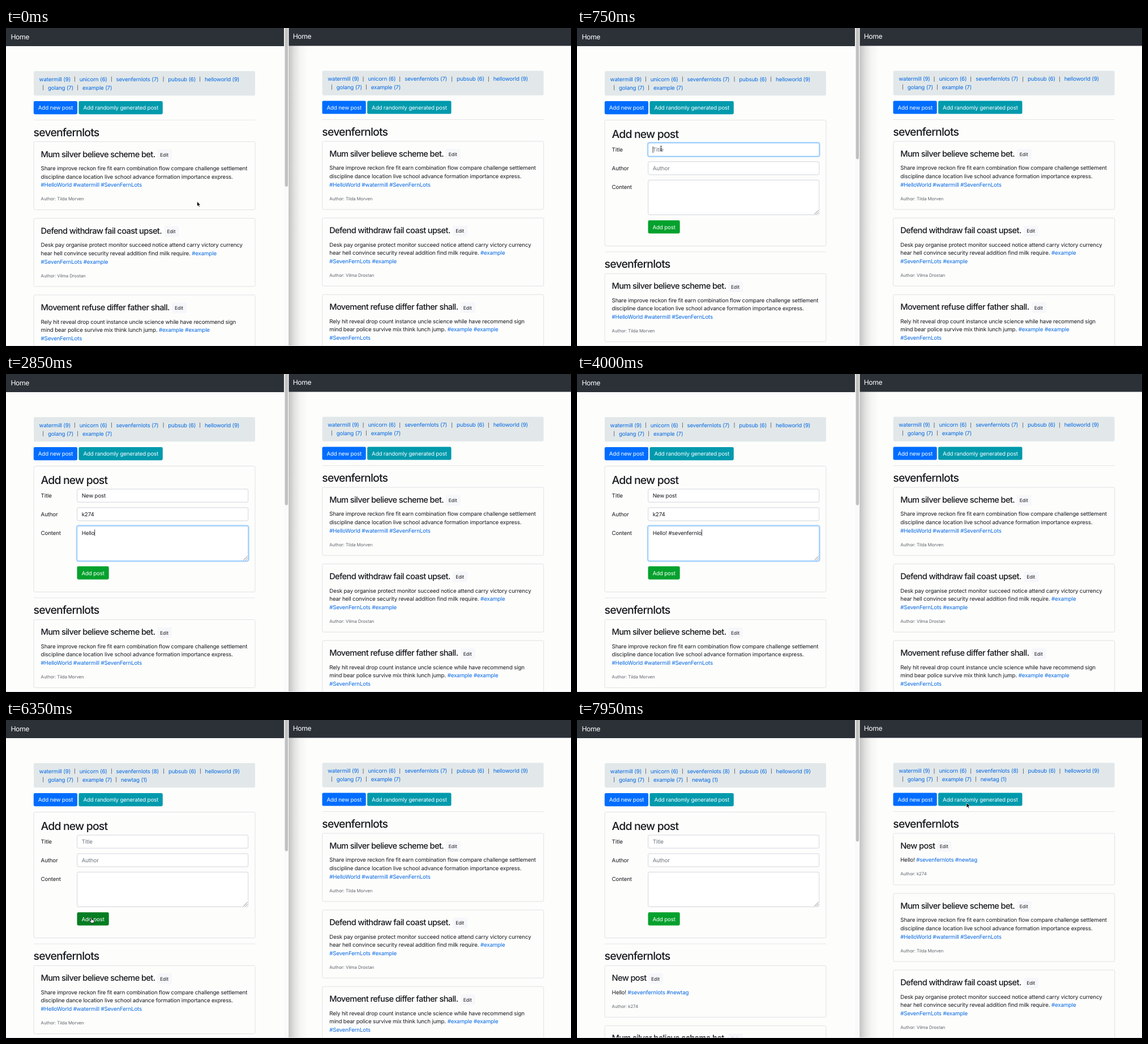
An HTML page for the animation above (8000 ms loop, 998 px wide and 561 px high).

```html
<!DOCTYPE html>
<html lang="en">
<head>
<meta charset="utf-8">
<title>Live feed</title>
<style>
  html, body { margin: 0; width: 100%; height: 100%; overflow: hidden; background: #fdfdfc; }
  svg { display: block; width: 998px; height: 561px; }
  text {
    font: 9.73px Inter, "Open Sans", sans-serif; letter-spacing: -.0155em; fill: #16191d;
    white-space: pre; font-optical-sizing: none; text-rendering: geometricPrecision;
  }
  .h2 { font-size: 19.46px; font-weight: 500; letter-spacing: -.043em; }
  .h4 { font-size: 14.6px; font-weight: 500; letter-spacing: -.042em; }
  .brand { font-size: 12.16px; letter-spacing: -.03em; fill: #fff; }
  .small { font-size: 7.78px; letter-spacing: -.008em; fill: #5e656c; }
  .edit { font-size: 8.5px; letter-spacing: 0; }
  .bar { font-size: 7.6px; }
  .light { fill: #fff; }
  .muted { fill: #6c757d; }
  .link { fill: #0568e4; }
  .card { fill: none; stroke: #dadbdd; stroke-width: .8; }
  .field { fill: #fff; stroke: #c6ccd3; stroke-width: .8; }
  .focus { stroke: #80bdff; }
  .ring { fill: none; stroke: #aed8fb; stroke-width: 2; }
</style>
</head>
<body>
<svg viewBox="0 0 998 561">
  <defs>
    <linearGradient id="shade">
      <stop offset="0" stop-opacity=".23"/>
      <stop offset=".3" stop-opacity=".11"/>
      <stop offset=".6" stop-opacity=".035"/>
      <stop offset="1" stop-opacity="0"/>
    </linearGradient>
  </defs>
  <g id="scene"></g>
  <g id="cursor"></g>
</svg>
<script>
const LOOP = 8000, FORM_SHIFT = 232.8;
const TAG = 'sevenfernlots';
const FORM_OPEN = 450, SUBMIT = 6150, LEFT_LIST = 6500, RIGHT_LIST = 6550;
const scene = document.getElementById('scene');
const cursor = document.getElementById('cursor');

const NEW_POST = { title: 'New post', editX: 131, author: 'k274', lines: [`Hello! #${TAG} #newtag`] };
const POSTS = [
  { title: 'Mum silver believe scheme bet.', editX: 272, author: 'Tilda Morven', lines: [
    'Share improve reckon fire fit earn combination flow compare challenge settlement',
    'discipline dance location live school advance formation importance express.',
    '#HelloWorld #watermill #SevenFernLots'] },
  { title: 'Defend withdraw fail coast upset.', editX: 284.5, author: 'Vilma Drostan', lines: [
    'Desk pay organise protect monitor succeed notice attend carry victory currency',
    'hear hell convince security reveal addition find milk require. #example',
    '#SevenFernLots #example'] },
  { title: 'Movement refuse differ father shall.', editX: 298, author: 'Orla Penwick', lines: [
    'Rely hit reveal drop count instance uncle science while have recommend sign',
    'mind bear police survive mix think lunch jump. #example #example',
    '#SevenFernLots'] },
];

// name, count, x, row
const TAGS = [
  ['watermill', 9, 58.6, 0], ['unicorn', 6, 129.7, 0], [TAG, 7, 194.5, 0],
  ['pubsub', 6, 286.3, 0], ['helloworld', 9, 351, 0],
  ['golang', 7, 74, 1], ['example', 7, 135, 1], ['newtag', 1, 203, 1],
];

const BUTTONS = {
  add: { x: 48.8, y: 129, w: 77.2, label: 'Add new post', fill: '#006dff', hover: '#0060dc' },
  random: { x: 128.4, y: 129, w: 148.4, label: 'Add randomly generated post', fill: '#009aad' },
  submit: { x: 125.5, y: 339.3, w: 56.2, label: 'Add post', fill: '#05a12d', hover: '#057d23' },
};
const FIELDS = [
  { name: 'Title', y: 203, h: 23.1, hint: 'Title' },
  { name: 'Author', y: 235.8, h: 23.1, hint: 'Author' },
  { name: 'Content', y: 268.3, h: 61.2, hint: '' },
];

// time, x, y
const PATH = [
  [0, 337.5, 306], [400, 95, 141], [520, 95, 141], [720, 148.5, 212.5],
  [5400, 148.5, 212.5], [5850, 151, 349], [6850, 151, 349], [7700, 688, 146],
];

const CURSORS = {
  arrow: '<path d="M0 0V8.6L2 6.8 3.4 9.8 4.8 9.2 3.5 6.3H6.1Z" fill="#000" stroke="#fff" stroke-width=".7"/>',
  beam: '<path d="M-1.6-4.3Q0-4.3 0-3.2Q0-4.3 1.6-4.3M0-3.2V3.2M-1.6 4.3Q0 4.3 0 3.2Q0 4.3 1.6 4.3M-1 1H1" fill="none" stroke="#222" stroke-width=".9"/>',
  hand: '<path d="M-1 .6Q0-.6 .9.6V3.4L4 4.1Q4.9 4.5 4.7 5.6L3.9 9H-.6L-3.4 5.6Q-3.4 4.4-2.3 4.8L-1 5.8Z" fill="#fff" stroke="#000" stroke-width=".8"/>',
};

const text = (x, y, s, cls = '') => `<text x="${x}" y="${y}" class="${cls}">${s}</text>`;
const rect = (x, y, w, h, attrs, r = 2.4) =>
  `<rect x="${x}" y="${y}" width="${w}" height="${h}" rx="${r}" ${attrs}/>`;
const rule = y => rect(49, y, 391, .8, 'fill="#dedfe0"', 0);
const linkTags = s => s.replace(/#\w+/g, '<tspan class="link">$&</tspan>');
const inside = (p, x, y, w, h) => p.x >= x && p.x <= x + w && p.y >= y && p.y <= y + h;
const over = (p, b) => inside(p, b.x, b.y, b.w, 23.2);
const typed = (s, start, step, t) =>
  s.slice(0, Math.max(0, Math.floor((t - start) / step) + 1));

function button(b, hovered) {
  return rect(b.x, b.y, b.w, 23.2, `fill="${hovered ? b.hover : b.fill}"`) +
    text(b.x + 8, b.y + 15.3, b.label, 'light');
}

function tagBar(updated) {
  let out = rect(49, 76, 391, 43.3, 'fill="#e2e8e9"');
  for (const [name, count, x, row] of TAGS) {
    if (name === 'newtag' && !updated) continue;
    const y = 94 + row * 14.6;
    const total = count + (updated && name === TAG);
    const nudge = updated && row === 0 && x > 280 ? .6 : 0;
    if (name !== 'watermill') out += text(x + nudge - 9.6, y - .6, '|', 'bar');
    out += text(x + nudge, y, `${name} (${total})`, 'link');
  }
  return out;
}

function feed(posts) {
  let top = 200.5;
  let out = rule(161.8) + text(48.6, 190.6, TAG, 'h2');
  for (const { title, editX, lines, author } of posts) {
    const height = 76.4 + lines.length * 14.6;
    out += rect(49, top, 391, height, 'class="card"') +
      text(61.5, top + 27, title, 'h4') +
      rect(editX - 5, top + 13.6, 26, 18.8, 'fill="#f6f7fa"', 2) +
      text(editX, top + 26.3, 'Edit', 'edit');
    lines.forEach((line, i) => out += text(61.6, top + 50.6 + i * 14.6, linkTags(line)));
    out += text(61.6, top + height - 16.4, 'Author: ' + author, 'small');
    top += height + 15;
  }
  return out;
}

function form(values, focus, hovered) {
  let out = rect(49, 162.4, 391, 222.2, 'class="card"') + text(61.5, 193.6, 'Add new post', 'h2');
  FIELDS.forEach(({ name, y, h, hint }, i) => {
    const active = i === focus;
    out += text(61.6, y + 15.2, name);
    if (active) out += rect(124.7, y - 1, 304, h + 2, 'class="ring"', 3.2);
    out += rect(125.7, y, 302, h, `class="field ${active ? 'focus' : ''}"`);
    if (!values[i]) out += text(133.7, y + 15.2, hint, 'muted');
    out += text(133.7, y + 15.2, values[i], active ? 'active' : '');
  });
  return out + '<path d="M419.5 328.5l7-7M423 328.5l3.5-3.5" stroke="#666" stroke-width=".8"/>' +
    button(BUTTONS.submit, hovered);
}

function pane(tagsUpdated, listUpdated, middle, shift, hoverAdd) {
  const posts = listUpdated ? [NEW_POST, ...POSTS] : POSTS;
  return tagBar(tagsUpdated) + button(BUTTONS.add, hoverAdd) + button(BUTTONS.random) + middle +
    `<g transform="translate(0 ${shift})">${feed(posts)}</g>`;
}

function windowFrames(thumb) {
  return rect(499, 0, 34, 561, 'fill="url(#shade)"', 0) +
    rect(0, 0, 491, 32, 'fill="#2c3138"', 0) +
    rect(499.5, 0, 498.5, 31.5, 'fill="#2c3138"', 0) +
    rect(491, 0, 8.2, 561, 'fill="#fafafa"', 0) +
    rect(492.6, -4, 5.4, thumb + 4, 'fill="#c1c1c1"', 2.7) +
    text(8.4, 20, 'Home', 'brand') + text(506.7, 19.4, 'Home', 'brand');
}

function pointer(t) {
  let i = PATH.findIndex(p => p[0] > t);
  if (i < 0) i = PATH.length;
  const a = PATH[i - 1], b = PATH[i] || a;
  const u = b === a ? 0 : (t - a[0]) / (b[0] - a[0]);
  const k = u * u * (3 - 2 * u);
  return { x: a[1] + (b[1] - a[1]) * k, y: a[2] + (b[2] - a[2]) * k };
}

function typing(t) {
  if (t >= SUBMIT) return { values: ['', '', ''], focus: -1 };
  return {
    values: [
      typed('New post', 950, 100, t),
      typed(NEW_POST.author, 1950, 100, t),
      typed(`Hello! #${TAG} #new`, 2530, 80, t) + typed('tag', 5120, 80, t),
    ],
    focus: t < 620 || t >= 6000 ? -1 : t < 1850 ? 0 : t < 2400 ? 1 : 2,
  };
}

// The caret blinks from the last key press on.
function caretVisible(t) {
  const lastKey = t >= 5120 ? Math.min(t, 5280) : t >= 2400 ? Math.min(t, 4530)
    : t >= 1850 ? Math.min(t, 2250) : Math.max(620, Math.min(t, 1650));
  return (t - lastKey) % 1000 < 500;
}

// Adds the caret and the spelling underline next to the measured text.
function markText(focus, caretOn) {
  const el = scene.querySelector('.active');
  if (!el) return;
  const y = FIELDS[focus].y, content = el.textContent;
  let marks = '';
  if (caretOn) {
    marks += rect(133.7 + (content ? el.getComputedTextLength() : 0), y + 6, .8, 11.4, 'fill="#111"', 0);
  }
  if (content.includes(TAG + ' ')) {
    const start = el.getStartPositionOfChar(8).x, width = el.getSubStringLength(8, TAG.length);
    marks += `<path d="M${start} ${y + 17.4}h${width}" stroke="#e8352e" stroke-width="1.1" stroke-dasharray="1.2 .8"/>`;
  }
  scene.insertAdjacentHTML('beforeend', marks);
}

let shown = '';
function draw(t) {
  const p = pointer(t), open = t >= FORM_OPEN;
  const { values, focus } = typing(t);
  const pointerOn = t < 850 || t >= 5400;
  const onAdd = pointerOn && over(p, BUTTONS.add);
  const onSubmit = pointerOn && open && over(p, BUTTONS.submit);
  const listed = t >= LEFT_LIST, remote = t >= RIGHT_LIST;

  const html = windowFrames(!open ? 280 : listed ? 214.5 : 231.5) +
    pane(t >= SUBMIT, listed, open ? form(values, focus, onSubmit) : '', open ? FORM_SHIFT : 0, onAdd) +
    `<g transform="translate(509.7 -.6)">${pane(remote, remote, '', 0, false)}</g>` +
    rect(0, 560, 998, 1, 'fill="#e3e5ec"', 0);

  const caretOn = caretVisible(t);
  const key = html + caretOn;
  if (key !== shown) {
    shown = key;
    scene.innerHTML = html;
    markText(focus, caretOn);
  }

  const onField = open && FIELDS.some(f => inside(p, 125.7, f.y, 302, f.h));
  const kind = onAdd || onSubmit ? 'hand' : onField ? 'beam' : 'arrow';
  cursor.innerHTML = pointerOn ? CURSORS[kind] : '';
  cursor.setAttribute('transform', `translate(${p.x} ${p.y})`);
}

function frame() {
  draw(performance.now() % LOOP);
  requestAnimationFrame(frame);
}
frame();
</script>
</body>
</html>
```
